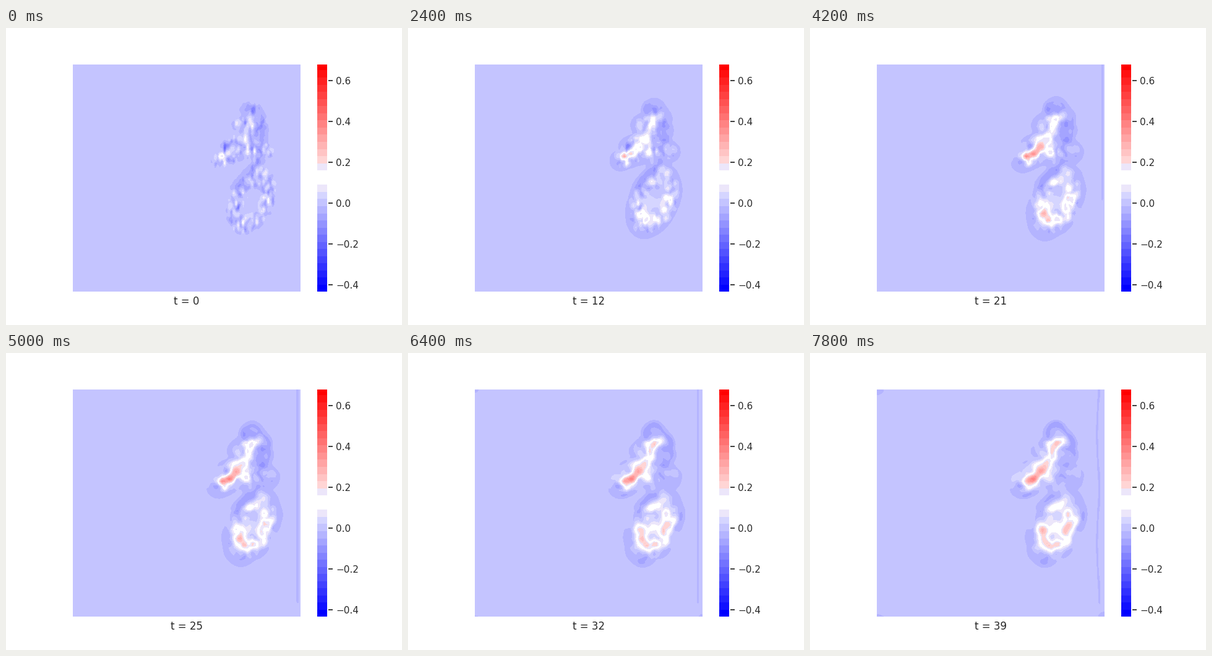
A matplotlib script for the animation above (8 s loop, 640x480 px).

```python
import numpy as np
import matplotlib.pyplot as plt
from matplotlib.animation import FuncAnimation
from matplotlib.patches import Rectangle

plt.rcParams["font.family"] = "DejaVu Sans"
N = 100
LAST = 39
INK = "#262626"
LEFT, TOP, RIGHT, BOTTOM = 108, 59, 476, 426

X, Y = np.meshgrid(np.linspace(LEFT, RIGHT, N), np.linspace(TOP, BOTTOM, N))
levels = -0.435 + 0.035 * np.arange(33)


def shade(i):
    """Blue to white to red; the steps beside white share one pale tint."""
    if i in (14, 17):
        return "#ece6fa"
    if i in (15, 16):
        return "#ffffff"
    cold = min(1, 16.35 * i / 255)
    warm = min(1, 16.35 * (31 - i) / 255)
    return (cold, min(cold, warm), warm)


colors = [shade(i) for i in range(32)]


def ramp(t, a, b):
    u = np.clip((t - a) / (b - a), 0, 1)
    return u * u * (3 - 2 * u)


def step(v):
    return 1 / (1 + np.exp(-np.clip(v, -40, 40)))


def path_distance(*pts):
    best = np.full((N, N), 1e3)
    for (x0, y0), (x1, y1) in zip(pts, pts[1:]):
        dx, dy = x1 - x0, y1 - y0
        u = np.clip(((X - x0) * dx + (Y - y0) * dy) / (dx * dx + dy * dy), 0, 1)
        best = np.minimum(best, np.hypot(X - x0 - u * dx, Y - y0 - u * dy))
    return best


def ridge(d, width):
    return np.exp(-(d / width) ** 2 / 2)


def bump(x, y, sx, sy):
    return np.exp(-((X - x) / sx) ** 2 / 2 - ((Y - y) / sy) ** 2 / 2)


def blur_matrix(s):
    i = np.arange(N)
    k = np.exp(-((i[:, None] - i) / s) ** 2 / 2)
    return k / k.sum(axis=1, keepdims=True)


def smooth(n, sx, sy):
    out = blur_matrix(sy) @ n @ blur_matrix(sx).T
    return out / out.std()


def mix(a, b, angle):
    return np.cos(angle) * a + np.sin(angle) * b


rng = np.random.default_rng(8)
noise = rng.standard_normal((4, N, N))

# The figure: a slanted cap, a wide arm, a neck and an oval ring
angle = np.linspace(0, 2 * np.pi, 25)
ring = np.hypot((X - 397 + (Y - 281) * .25) / 27, (Y - 281) / 37) - 1
cap = path_distance((398, 131), (409, 146), (377, 157), (411, 166), (357, 193))
arm = path_distance((343, 214), (375, 204), (400, 192), (423, 200),
                    (402, 207), (406, 228), (421, 242))
dist = np.minimum(np.minimum(cap, arm), 29 * np.abs(ring)) - 10
body = step((1 - dist) / 1.4)

# Lines along which the field warms up or stays cold
upper = path_distance((347, 212), (370, 198), (388, 171), (400, 146))
shelf = path_distance((350, 210), (374, 200), (406, 200))
lower = path_distance((404, 243), (390, 260), (376, 298), (390, 315),
                      (411, 300), (418, 264))
cold = path_distance((388, 132), (402, 131), (413, 160), (412, 205),
                     (400, 230), (372, 256))


def border(t):
    """Faint strip on the right wall and patches in the corners."""
    xs = 474 - 8.5 * max(0, t - 17) / 22 + 2 * ramp(t, 30, LAST) * np.sin(Y / 28)
    reach = 50 + 358 * ramp(t, 15, 25)
    out = ramp(t, 12, 18) * np.exp(-((X - xs) / 3.6) ** 2) * step((reach - Y) / 1.5)
    grow = 0.5 + 0.75 * max(0, t - 22)
    out += bump(LEFT, TOP, grow, grow * .8)
    out += bump(LEFT, BOTTOM, grow, grow * .35)
    out += bump(RIGHT, BOTTOM, grow * .9, grow * .7)
    return -0.023 * out


def field(t):
    p = t / LAST
    grow = ramp(t, 0, 24)
    late = ramp(t, 22, LAST)

    fine = smooth(mix(noise[0], noise[1], 0.035 * t), .5 + .6 * p, .9 + .4 * p)
    wide = smooth(mix(noise[2], noise[3], 0.02 * t), 2.6, 2.6)
    z = body * ((.055 - .02 * p) * fine - .03 * (1 - p))

    reach = 12 * (1 - np.exp(-t / 9))
    patchy = .9 * ramp(t, 8, LAST)
    z += -.027 * step((reach - dist) / 1.3) * (1 - body) * (1 + patchy * wide)

    rough = 1 + .3 * fine
    z += (.03 + .06 * grow + .05 * late) * ridge(upper, 6) * rough
    z += (.03 + .08 * grow - .08 * late) * ridge(shelf, 5) * rough
    z += (.03 + .09 * grow) * ridge(lower, 6) * rough
    z += (.04 * grow + .09 * late) * bump(401, 285, 11, 14)
    z -= (.05 + .02 * grow - .03 * late) * ridge(cold, 7) * rough

    z += (.24 * grow - .04 * late) * bump(374 - 7 * p, 188, 7, 7)
    z += (.20 * grow - .02 * late) * bump(380 - 3 * p, 304 - 14 * p, 7, 8)
    return np.clip(z + border(t), -.43, .68)


fig = plt.figure(figsize=(6.4, 4.8), dpi=100, facecolor="white")
ax = fig.add_axes([0, 0, 1, 1])
ax.set_xlim(0, 640)
ax.set_ylim(480, 0)
ax.axis("off")


def bar_y(v):
    return 283 - 330 * v


# Each step is laid over the one above it, so no seams show
for c, top in reversed(list(zip(colors, levels[1:]))):
    y = max(bar_y(top), TOP - .5)
    ax.add_patch(Rectangle((502.7, y), 16.6, BOTTOM - y, facecolor=c, lw=0))
for v in np.arange(-2, 4) / 5:
    y = bar_y(v)
    ax.plot([520.5, 528], [y, y], color=INK, lw=1.25, solid_capstyle="butt")
    ax.text(533, y, f"{v:.1f}".replace("-", "\u2212"), fontsize=11, color=INK,
            va="center_baseline")
label = ax.text(292, 447, "", fontsize=12, color=INK, ha="center", va="baseline")
plot = None


def draw(t):
    global plot
    if plot is not None:
        plot.remove()
    plot = ax.contourf(X, Y, field(t), levels=levels, colors=colors)
    label.set_text(f"t = {t}")
    return [label]


anim = FuncAnimation(fig, draw, frames=LAST + 1, interval=200, repeat=True,
                     repeat_delay=0, blit=False)
plt.show()
```
